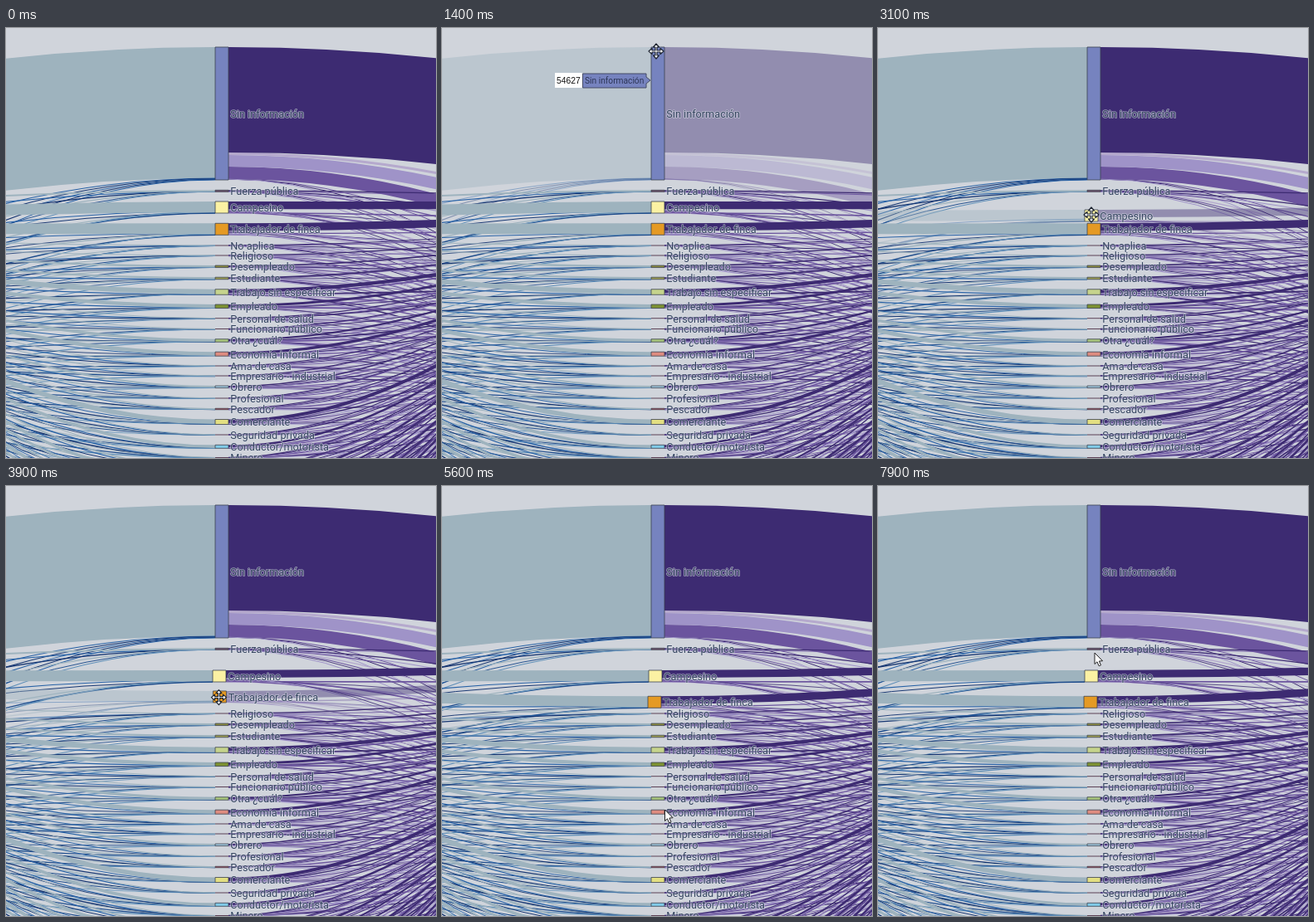
Animation, 518 px wide and 518 px high, one loop 8 s. Source, as an HTML page with a canvas:

```html
<!DOCTYPE html>
<html lang="es">
<meta charset="utf-8">
<style>
html, body { margin: 0; width: 100%; height: 100%; overflow: hidden; background: #d0d4db }
canvas { display: block }
</style>
<canvas id="c" width="518" height="518"></canvas>
<script>
const g = document.getElementById('c').getContext('2d');
const LOOP = 8000, REACH = 310;
const BLUES = ['#2862a6', '#143470', '#9eb3be', '#1d4c8c', '#5f8fb8'];
const PURPLES = ['#6b549e', '#3d2b72', '#9f93c8', '#6b549e', '#b3a8cd'];

// label, centre y, height, colour
const nodes = [
  ['Sin información', 103, 160, '#7683bf'],
  ['Fuerza pública', 196.3, 2, '#70506a'],
  ['Campesino', 216, 14, '#fbf1a3'],
  ['Trabajador de finca', 242.3, 14, '#e59a24'],
  ['No aplica', 262, 1],
  ['Religioso', 274, 1],
  ['Desempleado', 287.3, 2.5, '#8a8a40'],
  ['Estudiante', 301.5, 2.5, '#a0a050'],
  ['Trabajo sin especificar', 318, 6.5, '#c6d48c'],
  ['Empleado', 335.3, 4.5, '#7c9132'],
  ['Personal de salud', 349.7, 1],
  ['Funcionario público', 362.5, 1],
  ['Otra ¿cuál?', 376.5, 3.5, '#a9c67c'],
  ['Economía informal', 392.7, 5, '#de8c80'],
  ['Ama de casa', 407, 1],
  ['Empresario - industrial', 419, 1],
  ['Obrero', 432.3, 2.5, '#a4cbe0'],
  ['Profesional', 446, 1],
  ['Pescador', 459, 1.5, '#c04050'],
  ['Comerciante', 474.5, 6, '#e3df82'],
  ['Seguridad privada', 490, 1],
  ['Conductor/motorista', 504.3, 4, '#80cbe8'],
  ['Minero', 517.5, 1]
].map(([label, y, h, color = '#5c4256']) => ({ label, y, h, color }));
for (let y = 531; y < 660; y += 14) nodes.push({ label: '', y, h: 2 + y % 3, color: '#5c4256' });

let seed = 11;
const rnd = () => (seed = seed * 16807 % 2147483647) / 2147483647;

// Each link: side (-1 left, 1 right), offset in node, width, rise at the stage edge, colour
function link(n, side, o, w, d, color, main) {
  n.links.push({ side, o, w, d, color, main });
}
const bend = (y, k) => 15 - k * (y - 23) ** 2;

nodes.forEach((n, i) => {
  n.links = [];
  if (!i) {
    link(n, -1, -1, 158, 14, '#9eb3be', true);
    for (let j = 0; j < 5; j++) link(n, -1, 78 + j * .5, 1.2, 30 + j * 6, BLUES[j % 2]);
    link(n, 1, 71.5, 15, 33, '#6b549e');
    link(n, 1, 57, 14, 27, '#9f93c8');
    link(n, 1, 48.5, 3, 23, '#b5a9cd');
    link(n, 1, -16.5, 127, 13.5, '#3d2b72', true);
    for (let j = 0; j < 3; j++) link(n, 1, 79, 1, 52 + j * 12, PURPLES[j]);
    return;
  }
  const left = bend(n.y, .00031), right = bend(n.y, .0004);
  for (let j = 0; j < 5; j++)
    link(n, -1, n.h * (.3 + rnd() * .2), .8 + rnd() * .6, left + 4 + (j + rnd()) * 8, BLUES[j]);
  for (let j = 0; j < 8; j++)
    link(n, 1, n.h * (.2 + rnd() * .3), .8 + rnd() * (n.h > 3 ? 1 : .6), right + (j + rnd()) * 9, PURPLES[j % 5]);
  link(n, -1, -n.h * .04, Math.max(1, n.h * .92), left, '#9eb3be', true);
  link(n, 1, -n.h * .17, Math.max(1.1, n.h * .66), right, '#3d2b72', true);
});

// Eased value through [time, ...values] stops
function track(stops, t) {
  let i = stops.findIndex(s => s[0] > t);
  if (i < 0) return stops[stops.length - 1].slice(1);
  if (!i) return stops[0].slice(1);
  const a = stops[i - 1], b = stops[i], u = (t - a[0]) / (b[0] - a[0]), e = u * u * (3 - 2 * u);
  return a.slice(1).map((v, k) => v + (b[k + 1] - v) * e);
}
const shifts = {
  0: [[1500, 0, 0], [1700, 2, -10], [1950, 2, 0], [2200, 2, 0], [2400, 0, 0]],
  2: [[2700, 0, 0], [3100, -3, 10], [3300, -3, 13]],
  3: [[3600, 0, 0], [4100, -4, 18]]
};
const pointer = [[0, 500, 545], [100, 480, 515], [500, 330, 220], [900, 260, 50], [1400, 258, 28],
  [1500, 258, 28], [1700, 260, 18], [1950, 262, 30], [2100, 299, 223], [2500, 260, 215], [2700, 260, 215],
  [3100, 257, 225], [3300, 257, 228], [3600, 259, 243], [4100, 255, 261], [4400, 251, 279], [4600, 251, 279],
  [5000, 290, 400], [5300, 275, 480], [5900, 262, 300], [6400, 240, 150], [6700, 254, 95], [6900, 254, 48],
  [7250, 254, 48], [7800, 261, 201], [8000, 261, 201]];
// start, end, node, side (0 = both)
const hovers = [[500, 850, 0, 1], [850, 1900, 0, 0], [1900, 2300, 0, 1], [2400, 3400, 2, 0],
  [3500, 4200, 3, 0], [6300, 6850, 0, -1], [6850, 7300, 0, 0]];
const grabs = [[900, 2000], [2400, 3400], [3500, 4200], [6600, 7300]];
const tips = [[900, 1500], [6850, 7300]];
const within = (list, t) => list.find(s => t >= s[0] && t < s[1]);

function drawLink(n, l, faded) {
  const x = (l.side < 0 ? 252 : 268) + n.dx, y = n.y + n.dy + l.o, s = REACH / 250;
  // The far node stays put, so the visible end lags behind a drag
  const end = y + (l.d - n.dy * .25) * s * s;
  g.globalAlpha = faded ? .42 : 1;
  g.strokeStyle = l.color;
  g.lineWidth = l.w;
  g.beginPath();
  g.moveTo(x, y);
  g.quadraticCurveTo(x + l.side * REACH / 2, y, x + l.side * REACH, end);
  g.stroke();
  g.globalAlpha = 1;
}

function drawNode(n) {
  const x = 252 + n.dx, y = n.y + n.dy;
  g.fillStyle = n.color;
  g.fillRect(x, y - n.h / 2, 16, n.h);
  if (n.h > 1) {
    g.strokeStyle = '#3c4250';
    g.lineWidth = .8;
    g.strokeRect(x, y - n.h / 2, 16, n.h);
  }
  g.font = '12.7px Roboto, sans-serif';
  g.lineWidth = 1.7;
  g.lineJoin = 'round';
  g.strokeStyle = 'rgba(222,225,234,.6)';
  g.strokeText(n.label, x + 18.3, y + 4.8);
  g.fillStyle = '#34445f';
  g.fillText(n.label, x + 18.3, y + 4.8);
}

function shape(points, fill, stroke, width) {
  g.beginPath();
  points.forEach(([x, y]) => g.lineTo(x, y));
  g.closePath();
  g.fillStyle = fill;
  g.fill();
  g.strokeStyle = stroke;
  g.lineWidth = width;
  g.stroke();
}

function drawTip() {
  g.fillStyle = '#fff';
  g.fillRect(136, 54, 33, 18);
  shape([[169.5, 55], [246, 55], [246, 59], [251, 63], [246, 67], [246, 72], [169.5, 72]], '#7683bf', '#444b66', 1);
  g.fillStyle = '#111';
  g.font = '10.3px "Liberation Sans", Arial, sans-serif';
  g.fillText('54627', 138, 67);
  g.fillStyle = '#2c3556';
  g.font = '10.2px Roboto, sans-serif';
  g.fillText('Sin información', 172, 67);
}

function drawArrow() {
  shape([[0, 0], [0, 13.5], [3, 10.8], [5.2, 15.8], [7.5, 14.8], [5.4, 10], [9.6, 9.7]], '#fff', '#222', 1);
}

function drawMove() {
  const arm = [[-1, -1], [-1, -5], [-3.5, -5], [0, -9], [3.5, -5], [1, -5]];
  const points = [0, 1, 2, 3].flatMap(q => arm.map(([x, y]) => {
    for (let k = 0; k < q; k++) [x, y] = [-y, x];
    return [x, y];
  }));
  shape(points, '#fff', '#1c2330', 1.2);
}

function draw(t) {
  g.fillStyle = '#d0d4db';
  g.fillRect(0, 0, 518, 518);
  const hover = within(hovers, t), shown = nodes.filter((n, i) => i !== 4 || t < 3900);
  nodes.forEach((n, i) => [n.dx, n.dy] = shifts[i] ? track(shifts[i], t) : [0, 0]);
  for (const n of shown)
    for (const l of n.links) {
      const hit = hover && nodes[hover[2]] === n;
      drawLink(n, l, hit && (!hover[3] || l.main && l.side === hover[3]));
    }
  shown.forEach(drawNode);
  if (within(tips, t)) drawTip();

  const [x, y] = track(pointer, t);
  g.save();
  g.translate(x, y);
  if (t >= 4400 && t < 4700) {
    const glow = g.createRadialGradient(0, 1, 2, 0, 1, 17);
    glow.addColorStop(0, 'rgba(240,160,165,.75)');
    glow.addColorStop(1, 'rgba(216,62,78,.75)');
    g.fillStyle = glow;
    g.beginPath();
    g.arc(0, 1, 17, 0, 7);
    g.fill();
  }
  within(grabs, t) ? drawMove() : drawArrow();
  g.restore();
}

function frame() {
  draw(Math.floor(performance.now() % LOOP / 100) * 100);
  requestAnimationFrame(frame);
}
frame();
</script>
</html>
```
